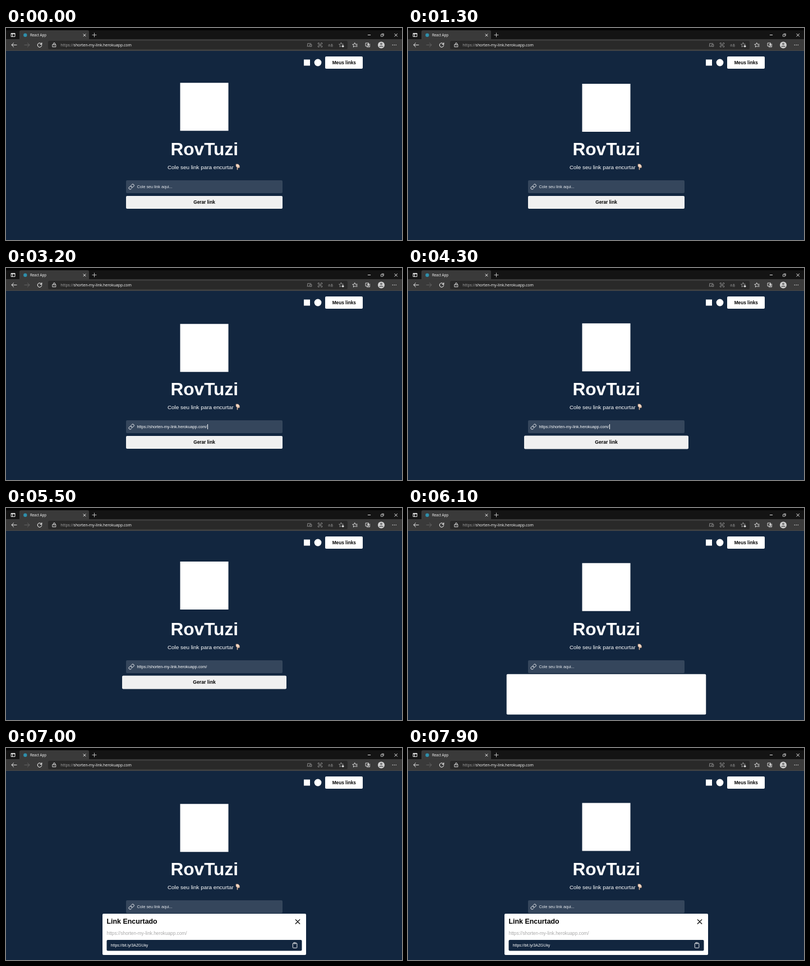
Animation of 706 by 380 pixels, one loop 8000 ms. Source, as an HTML page with a canvas:

```html
<!DOCTYPE html>
<html lang="pt">
<head>
<meta charset="utf-8">
<title>Encurtador</title>
<style>
html, body { margin: 0; width: 100%; height: 100%; overflow: hidden; background: #12263f; }
canvas { display: block; width: 706px; height: 380px; }
</style>
</head>
<body>
<canvas id="stage" width="706" height="380"></canvas>
<script>
const ctx = document.getElementById('stage').getContext('2d');
const LOOP = 8000;
const SANS = '"Liberation Sans", Arial, sans-serif';
const UI = '"Open Sans", sans-serif';
const NAVY = '#12263f';
const LONG_LINK = 'https://shorten-my-link.herokuapp.com/';

// Turning points of the floating tile: [time, offset]
const FLOAT = [[-300, 3], [550, 0], [1600, 5], [2650, 2], [3500, 5],
  [5450, 0], [6650, 5], [7700, 1.7], [8200, 4]];

const clamp = v => Math.max(0, Math.min(1, v));
const ramp = (t, from, to) => clamp((t - from) / (to - from));
const smooth = p => (1 - Math.cos(Math.PI * p)) / 2;

function floatOffset(t) {
  const i = FLOAT.findIndex(k => k[0] > t);
  const [t0, y0] = FLOAT[i - 1], [t1, y1] = FLOAT[i];
  return y0 + (y1 - y0) * smooth(ramp(t, t0, t1));
}

function box(x, y, w, h, r, fill) {
  ctx.fillStyle = fill;
  ctx.beginPath();
  ctx.roundRect(x, y, w, h, r);
  ctx.fill();
}

function dot(x, y, r, fill) {
  ctx.fillStyle = fill;
  ctx.beginPath();
  ctx.arc(x, y, r, 0, 7);
  ctx.fill();
}

function text(str, x, y, size, fill, { bold = false, align = 'left', family = SANS } = {}) {
  ctx.font = `${bold ? 'bold ' : ''}${size}px ${family}`;
  ctx.textAlign = align;
  ctx.fillStyle = fill;
  ctx.fillText(str, x, y);
}

function icon(d, x, y, { scale = 1, color = '#fff', width = 1 } = {}) {
  ctx.save();
  ctx.translate(x, y);
  ctx.scale(scale, scale);
  ctx.strokeStyle = color;
  ctx.lineWidth = width;
  ctx.lineCap = ctx.lineJoin = 'round';
  ctx.stroke(new Path2D(d));
  ctx.restore();
}

function scaled(cx, cy, s, draw) {
  ctx.save();
  ctx.translate(cx, cy);
  ctx.scale(s, s);
  ctx.translate(-cx, -cy);
  draw();
  ctx.restore();
}

const CHAIN = 'M10 13a5 5 0 0 0 7.54.54l3-3a5 5 0 0 0-7.07-7.07l-1.72 1.71' +
  'M14 11a5 5 0 0 0-7.54-.54l-3 3a5 5 0 0 0 7.07 7.07l1.71-1.71';
const CLIPBOARD = 'M16 4h2a2 2 0 0 1 2 2v14a2 2 0 0 1-2 2H6a2 2 0 0 1-2-2V6a2 2 0 0 1 2-2h2' +
  'M9 2h6a1 1 0 0 1 1 1v2a1 1 0 0 1-1 1H9a1 1 0 0 1-1-1V3a1 1 0 0 1 1-1z';
const STAR = 'M0-4L1.2-1.3L4-1L1.9.9L2.5 3.8L0 2.3L-2.5 3.8L-1.9.9L-4-1L-1.2-1.3Z';

function drawBrowser() {
  ctx.fillStyle = '#141414';
  ctx.fillRect(0, 0, 706, 21);
  ctx.fillStyle = '#000';
  ctx.fillRect(0, 0, 706, 4);
  ctx.fillStyle = '#3a3a3a';
  ctx.fillRect(0, 20, 706, 21);
  ctx.fillStyle = '#4a4a4a';
  ctx.fillRect(0, 40, 706, 1);
  box(24, 4, 124, 18, [3, 3, 0, 0], '#3a3a3a');
  box(75, 23, 534, 15, 2.5, '#292929');

  // Tab strip
  icon('M-3-3h6.5v6h-6.5zM-3-1.8h6.5M-1-1.5v4.5', 12.5, 12.5, { width: .9 });
  dot(34.3, 12.7, 3.2, '#2f8fab');
  text('React App', 43, 15, 6.2, '#fff', { family: UI });
  icon('M-2-2L2 2M2-2L-2 2', 140, 12.8, { width: .9 });
  icon('M-3.5 0h7M0-3.5v7', 157.5, 12.5, { color: '#ccc', width: .9 });
  icon('M-2.2 0h4.4', 647.5, 12.5, { width: .9 });
  icon('M-2.3-1h3.4v3.4h-3.4zM-1-2.4h3.4v3.4', 671, 12.7, { width: .7 });
  icon('M-2.4-2.4l4.8 4.8M2.4-2.4l-4.8 4.8', 695.2, 12.7, { width: .9 });

  // Toolbar
  icon('M4.5 0h-9l3.7-3.6M-4.5 0l3.7 3.6', 14.5, 30.4, { width: .9 });
  icon('M-4.5 0h9l-3.7-3.6M4.5 0l-3.7 3.6', 37.5, 30.4, { color: '#696969', width: .9 });
  icon('M3.6-1.2A3.8 3.8 0 1 0 3.8.6M3.8-4v2.8h-2.8', 60, 30.5);
  icon('M-2.8-1h5.6v4.4h-5.6zM-1.5-1v-1.4a1.5 1.5 0 0 1 3 0v1.4', 86, 30.5, { width: .8 });
  dot(86, 31.7, .6, '#fff');
  text('https://', 97.3, 33, 6.9, '#a5a5a5', { family: UI });
  text('shorten-my-link.herokuapp.com', 120.6, 33, 6.9, '#fff', { family: UI });

  const dim = { color: '#a8a8a8', width: .8 };
  icon('M-3.3 1.5v-4h6M-4 2.5h4M1.2-.8h2.6v3.6h-2.6z', 541, 30.3, dim);
  icon('M-3.6-1.7v-1.9h2M1.6-3.6h2v1.9M3.6 1.7v1.9h-2M-1.6 3.6h-2v-1.9M-1.5-1.5h3v3h-3z', 560, 30.4, dim);
  text('a', 574.2, 32.6, 6.5, '#999', { family: UI });
  text('あ', 578, 32.8, 5.4, '#999', { family: '"Noto Sans CJK JP", "Noto Sans CJK", sans-serif' });
  icon(STAR, 597.5, 30.2, dim);
  dot(600.8, 32.7, 1.8, '#ddd');
  icon('M1.5 2.8L0 2.3L-2.5 3.8L-1.9.9L-4-1L-1.2-1.3L0-4L1.2-1.3H4.5M2.5.7h2M2.5 2.7h2', 621.7, 30.4, { width: .8 });
  icon('M-3.5-3.5h5v5.5h-5zM-1.7 3.6h5.2v-5.4M-1-.8h3M.5-2.3v3', 645, 30.4, { width: .8 });
  dot(669, 30.4, 6, '#d1d1d1');
  dot(669, 28.5, 2.1, '#777');
  ctx.fillStyle = '#777';
  ctx.beginPath();
  ctx.ellipse(669, 34, 3.8, 2.4, 0, Math.PI, 0);
  ctx.fill();
  for (const x of [689.3, 692.3, 695.3]) dot(x, 30.4, .7, '#fff');
}

function drawHand() {
  ctx.fillStyle = '#f4d7c2';
  ctx.strokeStyle = '#3d3431';
  ctx.lineWidth = .5;
  const hand = new Path2D('M409.8 243.8h4.2l2.7 3.2v2.8q-.4 1.6-1.5 1l-1.9.2v2.8q-.8 1.4-1.6 0v-4l-1.9-1.8z');
  ctx.fill(hand);
  ctx.stroke(hand);
  icon('M413.4 250.7v-2.2M415.2 250.6v-2', 0, 0, { color: '#8c6d5c', width: .4 });
}

function drawField(t) {
  const filled = t >= 3000 && t < 5700;
  const caretOn = t >= 1900 && t < 4400 && (t - 1900) % 1000 < 500;
  box(214, 273, 279, 23, 2, '#35465c');
  icon(CHAIN, 218, 278.9, { scale: .47, width: 2 });
  text(filled ? LONG_LINK : 'Cole seu link aqui...', 233.6, 287, 7.235, filled ? '#fff' : '#e6e9ed');
  if (caretOn) {
    ctx.fillStyle = '#fff';
    ctx.fillRect(filled ? 359 : 233, 280, 1, 9);
  }
}

function drawPage(t) {
  ctx.fillStyle = NAVY;
  ctx.fillRect(0, 41, 706, 339);
  box(531, 56.5, 11, 11, 0, '#fff');
  dot(556, 62, 6.4, '#fff');
  box(569, 51, 67, 22, 2, '#fff');
  text('Meus links', 602.8, 65, 8.27, '#000', { bold: true, align: 'center' });

  box(310.5, 96 + floatOffset(t), 86, 86, 0, '#fff');
  text('RovTuzi', 353.7, 227.7, 31.6, '#fff', { bold: true, align: 'center' });
  text('Cole seu link para encurtar', 288, 252.6, 9.87, '#fff');
  drawHand();
  drawField(t);

  const hover = smooth(ramp(t, 4000, 4300));
  scaled(353.5, 312.5, 1 + .05 * hover, () => {
    box(214, 301, 279, 23, 2, '#f0f0f0');
    text('Gerar link', 353.5, 315, 8.27, '#000', { bold: true, align: 'center' });
  });
}

function drawModal(t) {
  const open = ramp(t, 5680, 6260);
  if (!open) return;
  ctx.save();
  ctx.globalAlpha = clamp(open * 1.6);
  scaled(353.5, 334, 1 - (1 - open) ** 3, () => box(172, 297, 363, 74, 2, '#fff'));
  ctx.globalAlpha = ramp(t, 6120, 6840);
  text('Link Encurtado', 179.5, 315.3, 12.4, '#000', { bold: true });
  icon('M-3.7-3.7l7.4 7.4M3.7-3.7l-7.4 7.4', 520, 311.3, { color: '#000', width: 1.3 });
  text(LONG_LINK, 179.6, 334.6, 8.27, '#a8a8a8');
  box(179.5, 344, 348, 19.5, 2, NAVY);
  text('https://bit.ly/3AZGUky', 186.8, 356.3, 6.89, '#fff');
  icon(CLIPBOARD, 509.4, 348, { scale: .47, width: 2 });
  ctx.restore();
}

function frame(now) {
  const t = now % LOOP;
  drawPage(t);
  drawModal(t);
  drawBrowser();
  requestAnimationFrame(frame);
}
requestAnimationFrame(frame);
</script>
</body>
</html>
```
